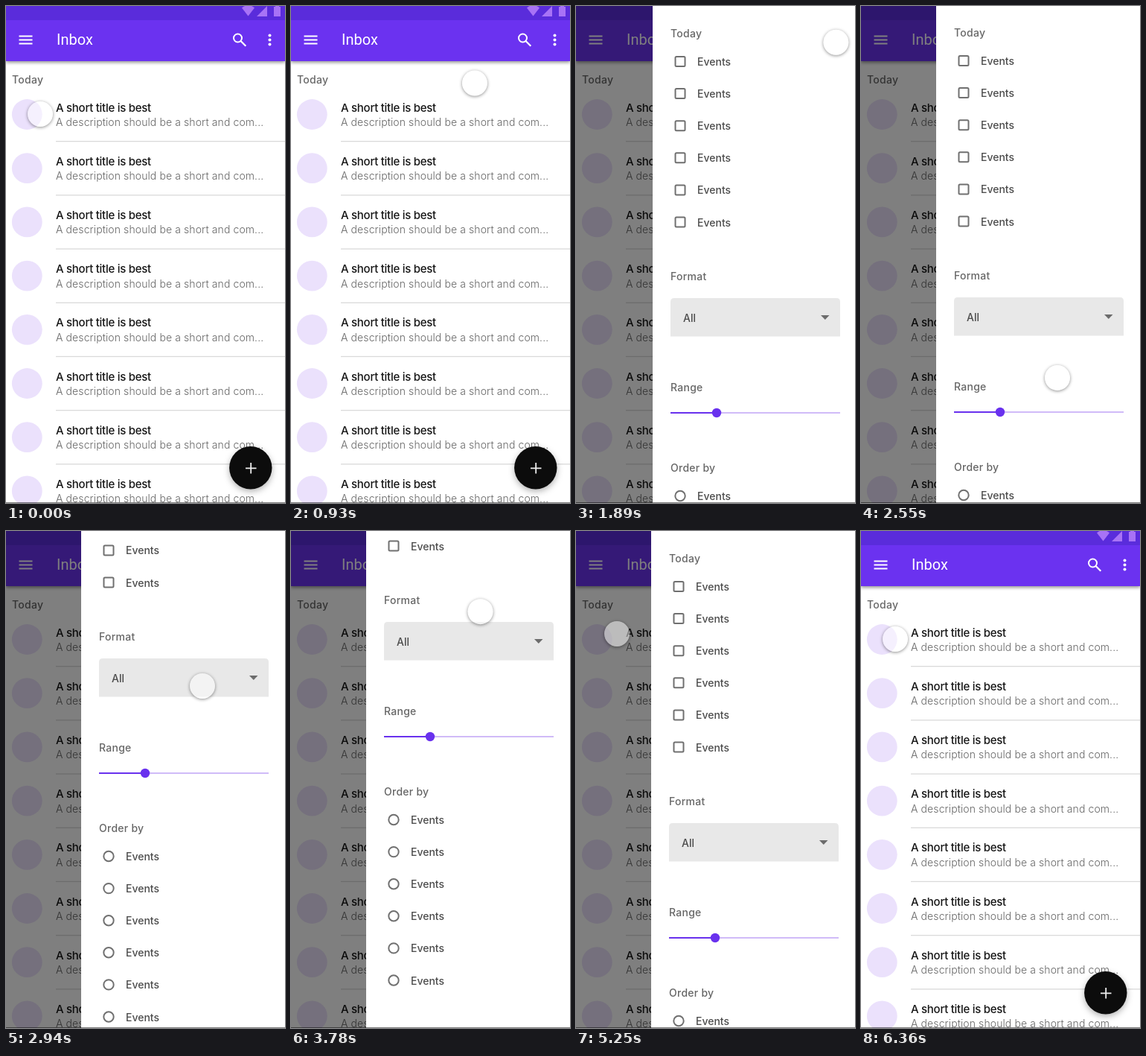
An HTML page that plays this animation: 375 px wide and 667 px high, repeating every 6390 ms.

```html
<!DOCTYPE html>
<html lang="en">
<head>
<meta charset="utf-8">
<title>Inbox filter drawer</title>
<style>
  html, body { margin: 0; width: 100%; height: 100%; overflow: hidden; background: #fff; }
  #stage { position: relative; width: 375px; height: 667px; overflow: hidden; }
  svg { position: absolute; inset: 0; display: block; }
  text { font-family: Inter, "Open Sans", sans-serif; }
  .bar { font: 400 20px Roboto, sans-serif; fill: #fff; }
  .head { font-size: 14px; font-weight: 500; letter-spacing: .25px; fill: #666; }
  .title { font-size: 15px; font-weight: 500; letter-spacing: -.28px; fill: #161616; }
  .desc { font-size: 14px; font-weight: 300; letter-spacing: .1px; fill: #666; }
  .option { font-size: 14px; font-weight: 500; fill: #4c4c4c; }
  .box { fill: none; stroke: #707070; stroke-width: 2; }
  #toolbar { filter: drop-shadow(0 2px 2px rgba(0, 0, 0, .42)); }
  #fab { filter: drop-shadow(0 3px 4px rgba(0, 0, 0, .3)); }
  #cursor {
    position: absolute; left: -17px; top: -17px; width: 34px; height: 34px; border-radius: 50%;
    background: rgba(255, 255, 255, .48); box-shadow: 0 1px 4px rgba(0, 0, 0, .45);
  }
</style>
</head>
<body>
<div id="stage">
  <svg width="375" height="667" viewBox="0 0 375 667">
    <rect width="375" height="667" fill="#fff"/>
    <g id="list"></g>
    <g id="toolbar">
      <rect width="375" height="74" fill="#6b32f0"/>
      <rect width="375" height="19" fill="#5a2cdb"/>
    </g>
    <g fill="#a873f6">
      <path d="M317 2.5Q319 .5 321 0H330Q332 .5 334 2.5L325.5 13.5Z"/>
      <path d="M351 0V14H337Z"/>
      <path d="M360 1H362V0H367V1H369V14H360Z"/>
    </g>
    <path d="M17.5 40.5H35.5M17.5 45.5H35.5M17.5 50.5H35.5" stroke="#fff" stroke-width="2"/>
    <text class="bar" x="68" y="52">Inbox</text>
    <g fill="none" stroke="#fff" stroke-width="2">
      <circle cx="311.5" cy="43" r="5.5"/>
      <path d="M315.5 47L322.3 53.8" stroke-width="2.2"/>
    </g>
    <g id="dots" fill="#fff"></g>
    <circle id="fab" cx="328.8" cy="619.8" r="28.7" fill="#0c0c0c"/>
    <path d="M322 620.3H336.5M329.2 613V627.5" stroke="#eee" stroke-width="1.8"/>
    <rect id="scrim" width="375" height="667" fill="#000" opacity="0"/>
    <g id="drawer">
      <rect width="376" height="667" fill="#fff"/>
      <g id="sheet"></g>
    </g>
    <rect y="666" width="375" height="1" fill="#000" opacity=".5"/>
  </svg>
  <div id="cursor"></div>
</div>
<script>
const LOOP = 6390, STEP = 30;
const DRAWER_WIDTH = 274, MAX_SCROLL = 270;
const $ = id => document.getElementById(id);

function add(parent, tag, attrs, text) {
  const el = document.createElementNS("http://www.w3.org/2000/svg", tag);
  for (const name in attrs) el.setAttribute(name, attrs[name]);
  if (text) el.textContent = text;
  parent.appendChild(el);
}
const label = (parent, cls, x, y, text) => add(parent, "text", { class: cls, x, y }, text);

function buildList(list) {
  label(list, "head", 8, 104, "Today");
  for (let i = 0; i < 8; i++) {
    const y = i * 72.2;
    add(list, "circle", { cx: 28.3, cy: 145.5 + y, r: 20.4, fill: "#ebe1fc" });
    label(list, "title", 67, 141.5 + y, "A short title is best");
    label(list, "desc", 67, 161 + y, "A description should be a short and com...");
    add(list, "rect", { x: 67, y: 181 + y, width: 308, height: 1.3, fill: "#dadada" });
  }
}

function buildSheet(sheet) {
  const heads = { Today: 42, Format: 368, Range: 516.5, "Order by": 625 };
  for (const name in heads) label(sheet, "head", 24, heads[name], name);

  for (let i = 0; i < 6; i++) {
    const y = i * 43.1;
    add(sheet, "rect", { class: "box", x: 30.5, y: 68 + y, width: 13, height: 13, rx: 1.5 });
    label(sheet, "option", 60, 80 + y, "Events");
    add(sheet, "circle", { class: "box", cx: 37, cy: 657.5 + y, r: 6.7 });
    label(sheet, "option", 60, 663 + y, "Events");
  }

  add(sheet, "path", { d: "M24 443.5V397Q24 392 29 392H247Q252 392 252 397V443.5Z", fill: "#e8e8e8" });
  label(sheet, "option", 41, 424, "All");
  add(sheet, "path", { d: "M226 415H237.5L231.8 421Z", fill: "#6c6c6c" });

  add(sheet, "rect", { x: 24, y: 545, width: 228, height: 2, fill: "#d0bbf8" });
  add(sheet, "rect", { x: 24, y: 545, width: 62, height: 2, fill: "#6931ee" });
  add(sheet, "circle", { cx: 86, cy: 546, r: 6.2, fill: "#6931ee" });
}

const progress = (t, from, to) => Math.min(1, Math.max(0, (t - from) / (to - from)));
const ease = (t, from, to) => (1 - Math.cos(Math.PI * progress(t, from, to))) / 2;
const easeOut = (t, from, to) => 1 - (1 - progress(t, from, to)) ** 3;

// A glide curves because its height lags behind; a drag runs straight.
const glide = (from, to, x, y) => ({ from, to, x, y, lag: 2 });
const drag = (from, to, x, y) => ({ from, to, x, y, lag: 1 });
const home = { x: 46, y: 145 };
const moves = [
  glide(330, 1330, 353, 48),
  glide(1800, 2500, 264, 500),
  drag(2530, 3100, 264, 143),
  glide(3100, 3900, 254, 104),
  drag(3980, 4550, 268, 525),
  glide(4680, 5240, 55, 138),
  glide(5400, 5900, home.x, home.y)
];

function cursorAt(t) {
  let { x, y } = home;
  for (const move of moves) {
    const p = ease(t, move.from, move.to);
    x += (move.x - x) * p;
    y += (move.y - y) * p ** move.lag;
  }
  return { x, y };
}

function draw(t) {
  const open = easeOut(t, 1560, 1970) - ease(t, 5340, 5760);
  const scroll = MAX_SCROLL * (ease(t, 2530, 3100) - ease(t, 3980, 4550));
  const shade = .5 * (ease(t, 1350, 1560) - ease(t, 5370, 5850));
  const { x, y } = cursorAt(t);

  $("drawer").setAttribute("transform", `translate(${375 - DRAWER_WIDTH * open} 0)`);
  $("sheet").setAttribute("transform", `translate(0 ${-Math.round(scroll)})`);
  $("scrim").setAttribute("opacity", shade);
  $("cursor").style.transform = `translate(${x}px, ${y}px)`;
}

buildList($("list"));
buildSheet($("sheet"));
for (let i = 0; i < 3; i++) add($("dots"), "circle", { cx: 354.5, cy: 39.5 + i * 6, r: 2 });

const start = performance.now();
function tick() {
  const t = (performance.now() - start) % LOOP;
  draw(Math.floor(t / STEP) * STEP);
  requestAnimationFrame(tick);
}
tick();
</script>
</body>
</html>
```
